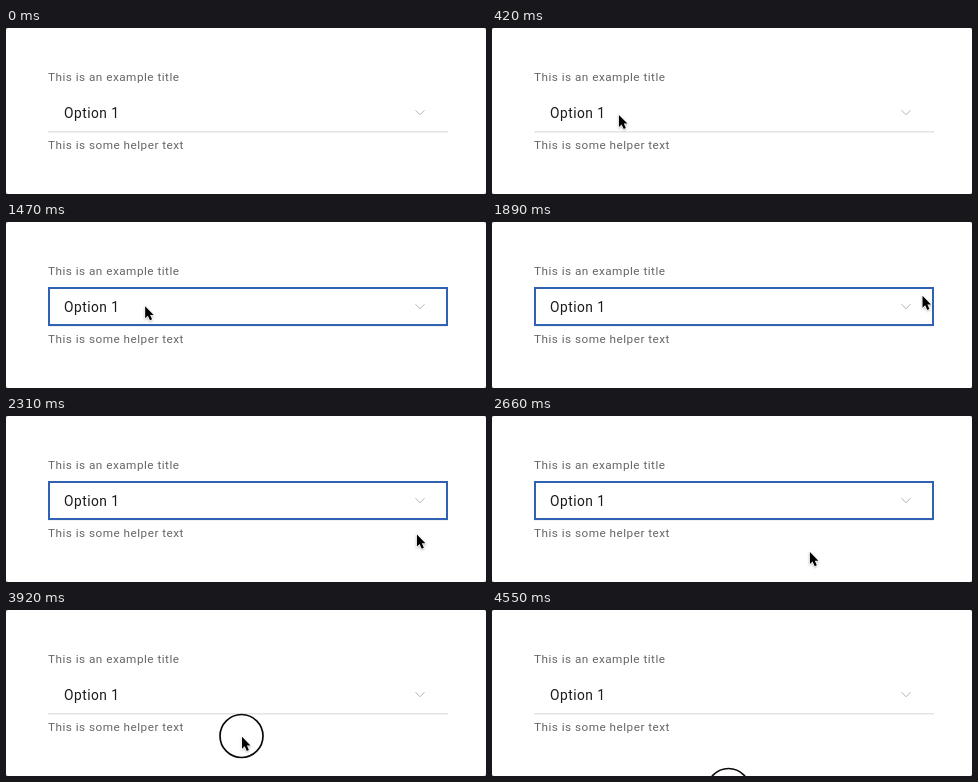
Recreate the animation shown at these times as an HTML page. Size 480 px wide and 166 px high, loop 4620 ms.

```html
<!DOCTYPE html>
<html lang="en">
<head>
<meta charset="utf-8">
<title>Select focus</title>
<style>
  html, body { margin: 0; width: 100%; height: 100%; overflow: hidden; background: #8c8c8c; }
  svg { display: block; width: 480px; height: 166px; }
  text { font-family: Roboto, "Noto Sans", sans-serif; }
  .label { font-size: 11.75px; letter-spacing: .48px; fill: #666; }
  .value { font-size: 13.75px; letter-spacing: .5px; fill: #1a1a1a; }
  #pointer path { filter: drop-shadow(0 1px .8px rgba(0, 0, 0, .25)); }
</style>
</head>
<body>
<svg viewBox="0 0 480 166">
  <rect width="480" height="166" rx="2.5" fill="#fff"/>
  <text class="label" x="42" y="53">This is an example title</text>
  <text class="value" x="58" y="90.4">Option 1</text>
  <text class="label" x="42" y="121">This is some helper text</text>
  <path d="M409.5 82.2 L414 86.8 L418.5 82.2" fill="none" stroke="#b4b4b4"/>
  <rect x="42" y="103" width="400" height="1.5" fill="#e4e4e4"/>
  <rect id="focus" x="43" y="66" width="398" height="37" fill="none" stroke="#2f62b3" stroke-width="2"/>
  <g id="pointer">
    <circle id="ring" r="21.5" fill="none" stroke="#0a0a0a" stroke-width="1.7"/>
    <path d="M.5 .8 V12.8 L3.2 10.3 L5.3 14.9 L7.4 13.9 L5.4 9.5 H9 Z"
          fill="#000" stroke="#fff" stroke-width="1.2" paint-order="stroke"/>
  </g>
</svg>
<script>
  const LOOP = 4620, STEP = 70;

  const easeOut = power => u => 1 - (1 - u) ** power;
  const easeIn = power => u => u ** power;
  const easeBoth = u => (1 - Math.cos(Math.PI * u)) / 2;

  const option = [123.5, 84], corner = [430, 73], below = [369, 132], outside = [235.5, 126];

  // Each move follows a quadratic curve; the bend is its control point
  const moves = [
    { start: 140, end: 490, from: [197, 136], to: option, ease: easeOut(2) },
    { start: 490, end: 1400, from: option, to: option },
    { start: 1400, end: 1890, from: option, to: corner, ease: easeBoth },
    { start: 1890, end: 2520, from: corner, bend: [427, 128], to: below, ease: easeIn(1.5) },
    { start: 2520, end: 3220, from: below, bend: [262, 134], to: [236, 167], ease: easeOut(1.4) },
    { start: 3640, end: 3920, from: [237, 160], to: outside, ease: easeOut(2) },
    { start: 3920, end: 4200, from: outside, to: [235.5, 180], ease: easeIn(2) },
    { start: 4550, end: LOOP, from: [236.5, 180], to: [236.5, 180] }
  ];
  const clicks = [{ start: 910, end: 1120 }, { start: 3850, end: 4060 }, { start: 4550, end: LOOP }];
  const focused = [{ start: 980, end: 3920 }];

  const activeAt = (spans, t) => spans.find(s => t >= s.start && t < s.end);
  const show = (node, on) => node.setAttribute('visibility', on ? 'inherit' : 'hidden');
  const byId = id => document.getElementById(id);
  const pointer = byId('pointer'), ring = byId('ring'), focusBox = byId('focus');

  function place({ start, end, from, to, bend, ease = u => u }, t) {
    const s = ease((t - start) / (end - start)), r = 1 - s;
    return from.map((a, k) => {
      const mid = bend ? bend[k] : (a + to[k]) / 2;
      return r * r * a + 2 * r * s * mid + s * s * to[k];
    });
  }

  function draw(now) {
    const t = Math.floor((now % LOOP) / STEP) * STEP;
    const move = activeAt(moves, t);
    show(pointer, move);
    if (move) pointer.setAttribute('transform', `translate(${place(move, t)})`);
    show(ring, activeAt(clicks, t));
    show(focusBox, activeAt(focused, t));
  }

  const start = performance.now();
  function tick() {
    draw(performance.now() - start);
    requestAnimationFrame(tick);
  }
  tick();
</script>
</body>
</html>
```
